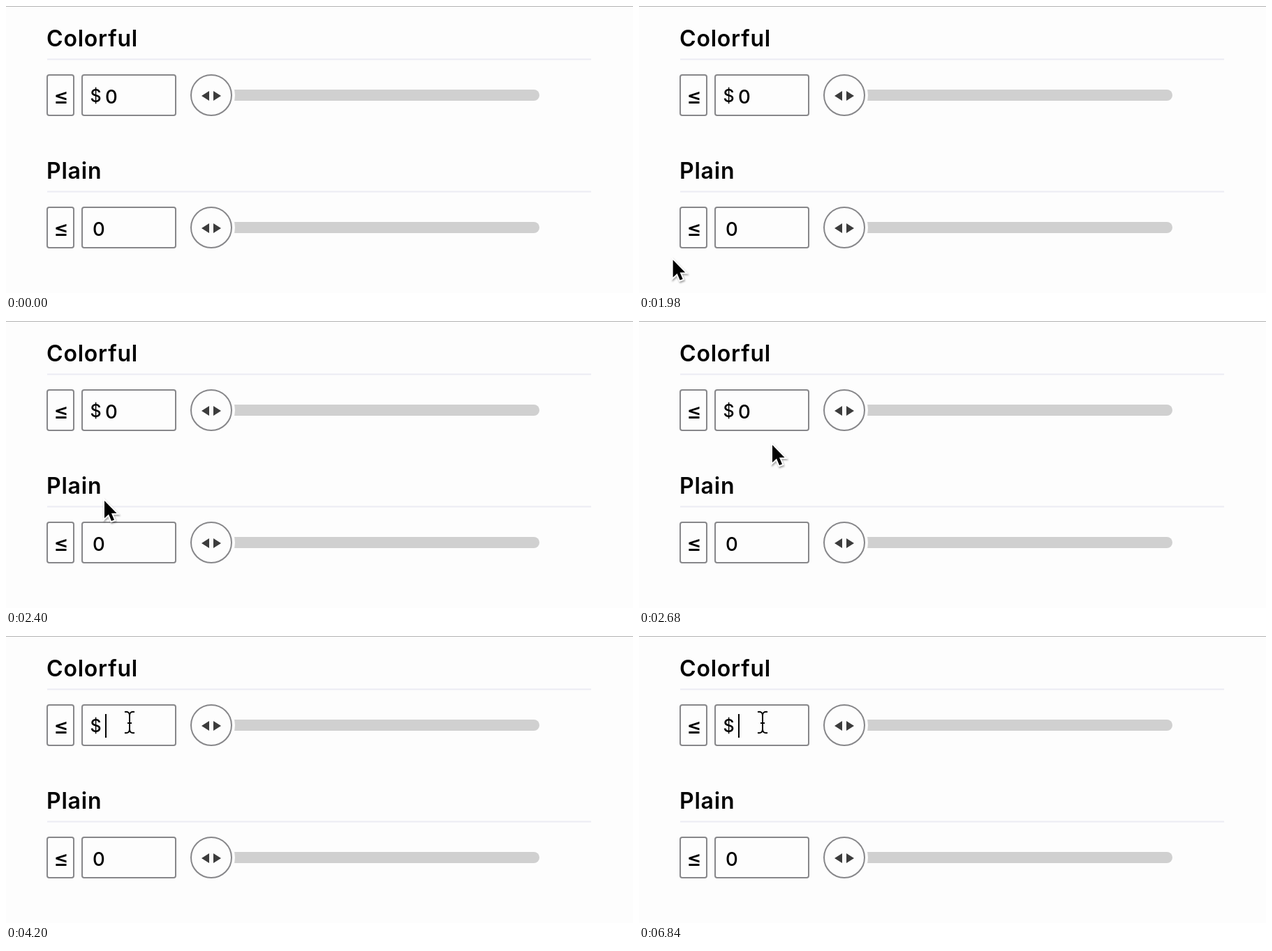
Animation of 898x412 px, one loop 8 s. Source, as an HTML page:

```html
<!DOCTYPE html>
<html lang="en">
<head>
<meta charset="utf-8">
<title>Range sliders</title>
<style>
  html, body { margin: 0; width: 100%; height: 100%; overflow: hidden; background: #fdfdfd; }
  svg { display: block; width: 898px; height: 412px; }
  text { font: 500 27.5px Inter, sans-serif; }
  .title { font-size: 32px; font-weight: 600; letter-spacing: .8px; }
  .sign { font-size: 32px; text-anchor: middle; }
  .frame { fill: #fdfdfd; stroke: #87878a; stroke-width: 2; }
  .ink { fill: none; stroke: #000; stroke-width: 2; }
  .halo { fill: none; stroke: #fff; stroke-width: 5; }
  .shadow { filter: drop-shadow(1px 2px 1px #0005); }
</style>
</head>
<body>
<svg viewBox="0 0 898 412">
  <defs>
    <g id="row">
      <path d="M59 76.5H838" stroke="#ebebf3" stroke-width="2"/>
      <rect class="frame" x="59" y="99" width="38" height="58" rx="3"/>
      <rect class="frame" x="109" y="99" width="134" height="58" rx="3"/>
      <text class="sign" x="79" y="141">≤</text>
      <path d="M320 120H756a8 8 0 0 1 0 16H320Z" fill="#d0d0d0"/>
      <circle cx="294" cy="128" r="34" fill="#fdfdfd"/>
      <circle class="frame" cx="294" cy="128" r="29"/>
      <path d="M280 129L291 122V136ZM308 129L297 122V136Z" fill="#3c3c3c"/>
    </g>
    <path id="beam" d="M-7-15Q0-16 0-10V10Q0 16-7 15M7-15Q0-16 0-10M0 10Q0 16 7 15M-3 1H3"/>
  </defs>

  <path d="M0 .5H898" stroke="#b3b3b3"/>
  <use href="#row"/>
  <use href="#row" y="190"/>
  <text class="title" x="58" y="58">Colorful</text>
  <text class="title" x="58" y="248">Plain</text>
  <text x="120.5" y="138" style="font-size:25px">$</text>
  <text id="amount" x="142" y="140">0</text>
  <text x="124" y="330">0</text>
  <rect id="caret" x="142" y="112" width="2" height="34"/>

  <g id="cursor">
    <g id="arrow" class="shadow">
      <path d="M1 2V27L7 21.5L11 31L15 29.5L11 20H18.5Z" stroke="#fff" stroke-width="4" paint-order="stroke"/>
    </g>
    <g id="hand" class="shadow">
      <path class="ink" style="fill:#fff" stroke-linejoin="round"
        d="M1 5Q0 1 3 1Q5 1 6 4L9 12Q11 9 14 12Q16 10 18 13Q23 12 23 18V22Q22 27 20 32H6L-4 21Q-7 16-3 16Q0 16 4 20Z"/>
      <path class="ink" d="M9 18V27M13.5 18V27M18 18V27"/>
    </g>
    <g id="text">
      <use href="#beam" class="halo"/>
      <use href="#beam" class="ink"/>
    </g>
  </g>
</svg>
<script>
const LOOP = 8000;
const el = id => document.getElementById(id);
const clamp = v => Math.min(1, Math.max(0, v));
const show = (id, on) => { el(id).style.display = on ? '' : 'none'; };

// Pointer path: time, x, y
const path = [
  [1660, 34, 412], [1880, 31, 380], [2220, 87, 321], [2400, 140, 256], [2500, 140, 256],
  [2680, 190, 176], [3060, 190, 176], [3360, 183, 142], [3440, 183, 142],
  [3540, 171, 128], [3660, 177, 124]
];

function pointerAt(t) {
  const next = path.findIndex(p => p[0] > t);
  if (next < 1) return path[path.length - 1].slice(1);
  const [t0, x0, y0] = path[next - 1], [t1, x1, y1] = path[next];
  const k = (t - t0) / (t1 - t0);
  return [x0 + (x1 - x0) * k, y0 + (y1 - y0) * k];
}

function pointerKind(x, y) {
  const inRow = (y > 98 && y < 158) || (y > 288 && y < 348);
  if (inRow && x > 58 && x < 98) return 'hand';
  if (inRow && x > 108 && x < 244) return 'text';
  return 'arrow';
}

function caretOpacity(t) {
  if (t < 4040) return 0;
  return t < 6000 ? 1 - clamp((t - 5340) / 140) : clamp((t - 6740) / 100);
}

function draw() {
  const t = performance.now() % LOOP;
  const [x, y] = pointerAt(t);
  const kind = pointerKind(x, y);
  show('cursor', t >= path[0][0]);
  el('cursor').setAttribute('transform', `translate(${x} ${y})`);
  for (const id of ['arrow', 'hand', 'text']) show(id, id === kind);
  show('amount', t < 4040);
  el('caret').style.opacity = caretOpacity(t);
  requestAnimationFrame(draw);
}
draw();
</script>
</body>
</html>
```
